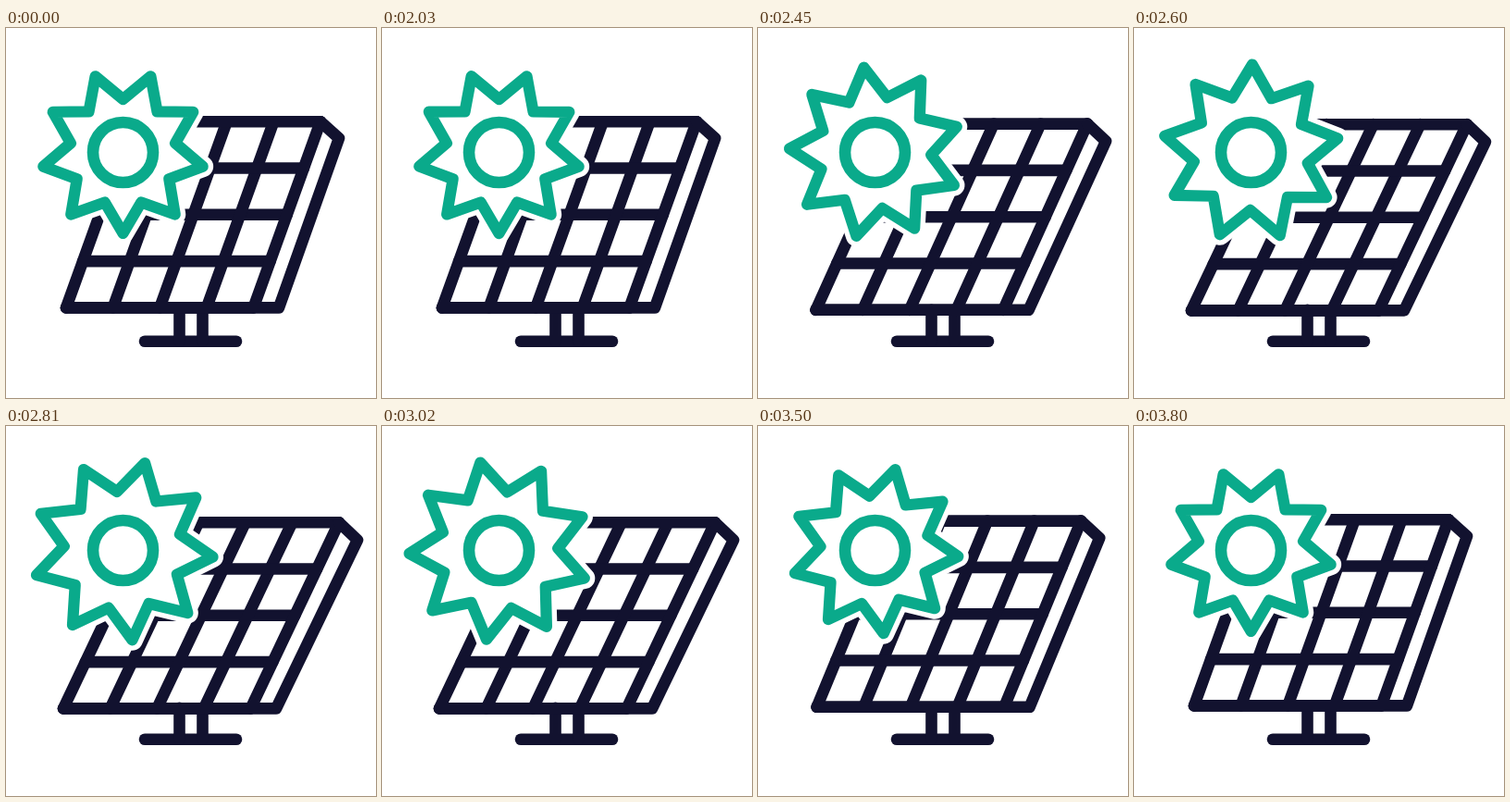
An HTML page with a canvas that plays this animation: 400 by 400 pixels, repeating every 3.83 s.

```html
<!DOCTYPE html>
<html lang="en">
<head>
<meta charset="utf-8">
<title>Solar panel</title>
<style>
html, body { margin: 0; width: 100%; height: 100%; overflow: hidden; background: #fff; }
canvas { display: block; width: 400px; height: 400px; }
</style>
</head>
<body>
<canvas id="stage" width="400" height="400"></canvas>
<script>
const ctx = document.getElementById('stage').getContext('2d');
const LOOP = 3830, START = 2000, SPAN = 1800, TILT = 630;
const NAVY = '#12122f', GREEN = '#0aaa8b';
const CX = 126.5, CY = 134.5;

const mix = (a, b, k) => a + (b - a) * k;

function ease(x) {
  const s = Math.min(1, Math.max(0, x));
  return s * s * (3 - 2 * s);
}

function stroke(color, width) {
  ctx.strokeStyle = color;
  ctx.lineWidth = width;
  ctx.stroke();
}

function line(...pts) {
  ctx.beginPath();
  for (let i = 0; i < pts.length; i += 2) ctx.lineTo(pts[i], pts[i + 1]);
  stroke(NAVY, 12.6);
}

function drawStand() {
  line(150, 338.7, 249, 338.7);
  line(187.5, 304.8, 187.5, 338);
  line(212.5, 304.8, 212.5, 338);
}

function drawPanel(k) {
  const wide = 202.5;
  const left = mix(65, 62, k), bottom = mix(302.4, 305.4, k);
  const right = mix(340, 360, k), top = mix(101.2, 104.2, k);
  const lean = right - wide - left;
  for (let i = 0; i <= 4; i++) {
    const x = left + wide * i / 4;
    line(x, bottom, x + lean, top);
    const y = mix(bottom, top, i / 4);
    const shift = left + lean * i / 4;
    line(shift, y, shift + wide, y);
  }
  line(right, top, mix(360, 380, k), mix(119.2, 123.2, k),
    mix(295, 292, k), bottom, left, bottom);
}

function drawSun(turn, scale) {
  ctx.beginPath();
  for (let i = 0; i < 18; i++) {
    const a = (90 + turn + i * 20) * Math.PI / 180;
    const r = (i % 2 ? 57.5 : 87.5) * scale;
    ctx.lineTo(CX + r * Math.cos(a), CY + r * Math.sin(a));
  }
  ctx.closePath();
  ctx.fillStyle = '#fff';
  ctx.fill();
  stroke('#fff', 23);
  stroke(GREEN, 12.2);

  ctx.beginPath();
  ctx.arc(CX, CY, 32.5, 0, Math.PI * 2);
  stroke(GREEN, 12.6);
}

function draw(ms) {
  const t = Math.min(SPAN, Math.max(0, ms - START));
  const near = Math.min(t, SPAN - t); // time to the closer end
  ctx.fillStyle = '#fff';
  ctx.fillRect(0, 0, 400, 400);
  ctx.lineCap = ctx.lineJoin = 'round';
  drawStand();
  drawPanel(ease(near / TILT));
  drawSun(80 * ease(t / SPAN), 1 + 0.115 * ease(near / (SPAN / 2)));
}

const begin = performance.now();
function tick() {
  draw((performance.now() - begin) % LOOP);
  requestAnimationFrame(tick);
}
tick();
</script>
</body>
</html>
```
